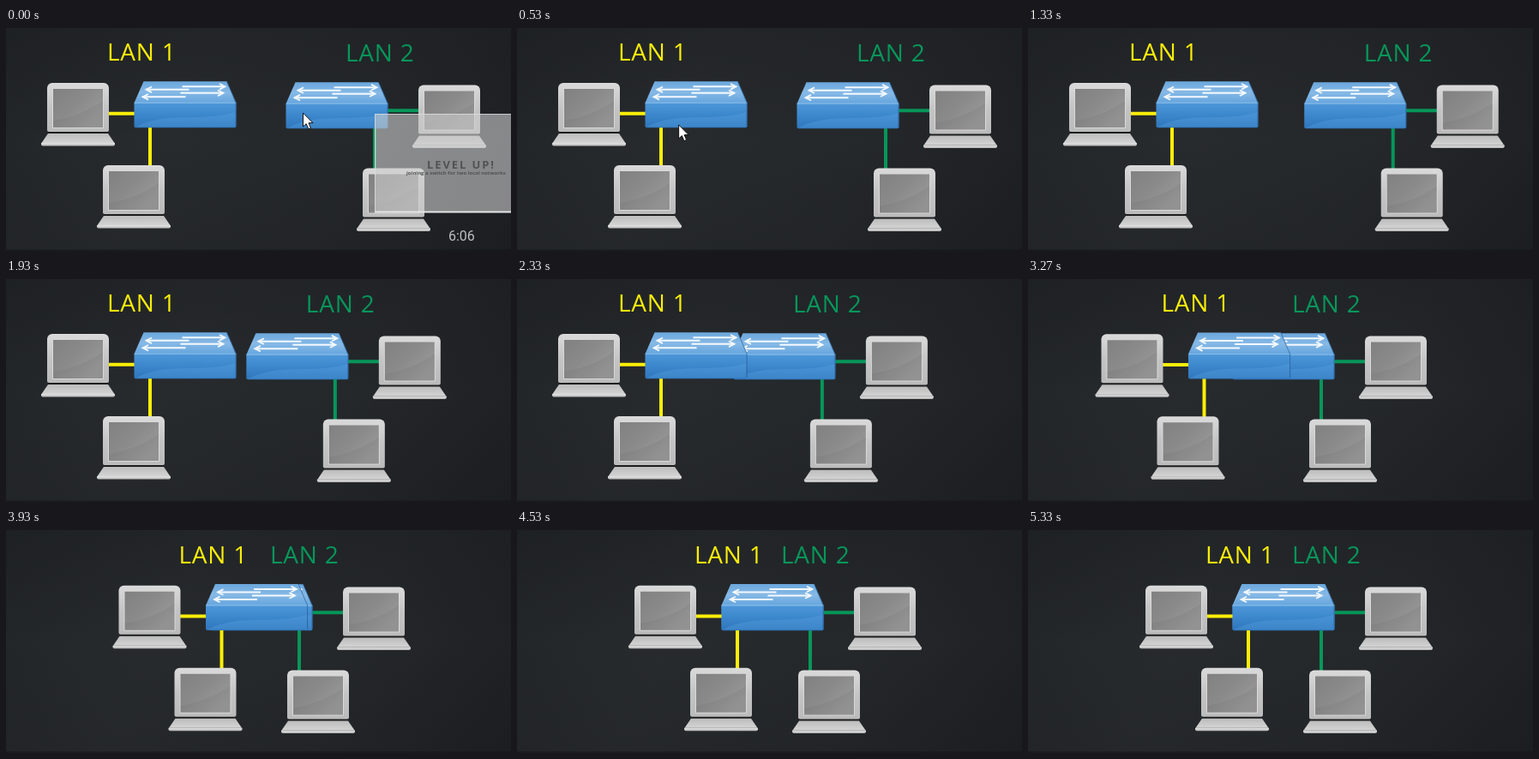
Animation of 589x260 px, one loop 5390 ms. Source, as an HTML page with a canvas:

```html
<!DOCTYPE html>
<html lang="en">
<head>
<meta charset="utf-8">
<title>Two LANs joining</title>
<style>
html, body { margin: 0; width: 100%; height: 100%; overflow: hidden; background: #222528; }
canvas { display: block; width: 589px; height: 260px; }
</style>
</head>
<body>
<canvas id="stage" width="589" height="260"></canvas>
<script>
const W = 589, H = 260, LOOP = 5390;
const ctx = document.getElementById('stage').getContext('2d');
const YELLOW = '#faee08', GREEN = '#07965a';

const ramp = (t, a, b) => Math.min(1, Math.max(0, (t - a) / (b - a)));
const mix = (a, b, k) => a + (b - a) * k;

function gradient(x0, y0, x1, y1, ...colors) {
  const g = ctx.createLinearGradient(x0, y0, x1, y1);
  colors.forEach((c, i) => g.addColorStop(i / (colors.length - 1), c));
  return g;
}

function poly(fill, ...pts) {
  ctx.beginPath();
  for (let i = 0; i < pts.length; i += 2) ctx.lineTo(pts[i], pts[i + 1]);
  ctx.closePath();
  ctx.fillStyle = fill;
  ctx.fill();
}

function box(fill, x, y, w, h, r) {
  ctx.beginPath();
  ctx.roundRect(x, y, w, h, r);
  ctx.fillStyle = fill;
  ctx.fill();
}

function line(color, width, ...pts) {
  ctx.beginPath();
  for (let i = 0; i < pts.length; i += 2) ctx.lineTo(pts[i], pts[i + 1]);
  ctx.strokeStyle = color;
  ctx.lineWidth = width;
  ctx.stroke();
}

function at(x, y, draw) {
  ctx.save();
  ctx.translate(x, y);
  draw();
  ctx.restore();
}

function background() {
  ctx.fillStyle = gradient(0, 0, W, H, '#222528', '#282b2e', '#25282b', '#1d1f23');
  ctx.fillRect(0, 0, W, H);
  ctx.fillStyle = gradient(0, 0, 0, H, 'rgba(18,20,23,.25)', 'rgba(18,20,23,0)', 'rgba(18,20,23,.15)');
  ctx.fillRect(0, 0, W, H);
  ctx.fillStyle = 'rgba(20,20,24,.5)';
  ctx.fillRect(0, 258, W, 2);
}

// Origin: top left of the monitor.
function computer(x, y) {
  at(x, y, () => {
    box('#1b1d1f', 1, 56, 70, 4, 0);
    box(gradient(0, 0, 0, 58, '#dadada', '#c4c4c4', '#bababa'), 0, 0, 72, 57, [6, 6, 2, 2]);
    box('#d9d9d9', 6, 6, 60, 47, 1);
    box(gradient(7, 7, 50, 52, '#818181', '#8a8a8a', '#9a9a9a'), 7, 7, 58, 45, 0);
    ctx.beginPath();
    ctx.moveTo(7, 44);
    ctx.quadraticCurveTo(39, 39, 65, 21);
    ctx.lineTo(65, 52);
    ctx.lineTo(7, 52);
    ctx.fillStyle = 'rgba(90,90,90,.12)';
    ctx.fill();
    poly(gradient(0, 59, 0, 71, '#bcbcbc', '#d6d6d6'), 1, 59, 71, 59, 78.5, 70, -6.5, 70);
    box(gradient(0, 70, 0, 73.5, '#e6e6e6', '#b4b4b4'), -7, 70, 86, 3.5, [0, 0, 2, 2]);
  });
}

function arrow(x, y, dir) {
  const tip = x + dir * 50;
  line('#f4f9fd', 2, x, y, tip, y);
  line('#f4f9fd', 1.8, tip - dir * 6.5, y - 3.3, tip, y, tip - dir * 6.5, y + 3.3);
}

// Origin: left end of the back edge line.
function hub(x, y) {
  at(x, y, () => {
    box(gradient(0, 25, 0, 54, '#4d97d9', '#3c86cb', '#2f76bb'), 0, 24, 119, 30, 2);
    ctx.beginPath();
    ctx.moveTo(2, 53);
    ctx.bezierCurveTo(40, 34, 75, 48, 118, 36);
    ctx.lineTo(118, 53);
    ctx.fillStyle = 'rgba(100,175,235,.25)';
    ctx.fill();
    poly(gradient(0, 0, 0, 25, '#6ba7dc', '#86b9e6', '#65a5de'), 11, 0, 108, 0, 119, 25, 0, 25);
    line('rgba(175,213,243,.6)', 1, 0, 25, 119, 25);
    line('rgba(40,95,150,.7)', 1, 108, 0, 118.6, 25, 118.6, 52);
    arrow(56, 6, 1);
    arrow(64, 9.5, -1);
    arrow(54, 13.5, 1);
    arrow(60, 18, -1);
  });
}

function label(text, x, y, color) {
  ctx.font = '400 28px "Open Sans", "Noto Sans", sans-serif';
  ctx.letterSpacing = '0.8px';
  ctx.fillStyle = color;
  ctx.fillText(text, x, y);
  ctx.letterSpacing = '0px';
}

function lan1(k) {
  at(89 * k, 0.7 * k, () => {
    label('LAN 1', 118, 38, YELLOW);
    line(YELLOW, 4, 118, 99.8, 151, 99.8);
    line(YELLOW, 4, 168, 114, 168, 161);
    computer(48, 64);
    computer(113, 160);
    hub(149.5, 62.3);
  });
}

function lan2(k) {
  at(-88 * k, 0, () => {
    label('LAN 2', 396, 39, GREEN);
    line(GREEN, 4, 443, 96.3, 482, 96.3);
    line(GREEN, 4, 430, 115, 430, 165);
    computer(481, 66.5);
    computer(416, 163.5);
    hub(326.5, 63.2);
  });
}

function preview(alpha) {
  if (alpha <= 0) return;
  ctx.save();
  ctx.globalAlpha = alpha;
  box('rgba(205,205,205,.6)', 430, 100, 170, 115, 0);
  line('rgba(225,225,225,.75)', 1, 589, 100.5, 430.5, 100.5, 430.5, 214);
  line('#e6e6e6', 2, 430, 214.5, 589, 214.5);
  ctx.filter = 'blur(.7px)';
  ctx.fillStyle = '#505254';
  ctx.font = 'bold 13px "Open Sans", sans-serif';
  ctx.letterSpacing = '1.9px';
  ctx.fillText('LEVEL UP!', 491, 163.5);
  ctx.letterSpacing = '0px';
  ctx.font = 'bold 6px "Open Sans", sans-serif';
  ctx.fillText('joining a switch for two local networks', 467, 171);
  ctx.filter = 'none';
  ctx.fillStyle = '#bcbec0';
  ctx.font = '16px Roboto, sans-serif';
  ctx.fillText('6:06', 516, 248);
  ctx.restore();
}

function pointer(t) {
  if (t > 960) return;
  const a = ramp(t, 70, 600), b = ramp(t, 600, 930);
  const x = mix(mix(346.5, 165, a), 20, b);
  const y = mix(mix(99, 115, a), -24, b);
  at(x, y, () => {
    const shape = [0, 0, 0, 16, 3.7, 12.7, 6.3, 18.7, 9, 17.5, 6.5, 11.7, 11.5, 11.7];
    poly('#fff', ...shape);
    line('#111', 1, ...shape, 0, 0);
  });
}

function draw(t) {
  background();
  lan2(ramp(t, 1270, 2530));
  lan1(ramp(t, 2733, 4010));
  preview(1 - ramp(t, 60, 330));
  pointer(t);
}

function frame() {
  draw(performance.now() % LOOP);
  requestAnimationFrame(frame);
}
frame();
</script>
</body>
</html>
```
